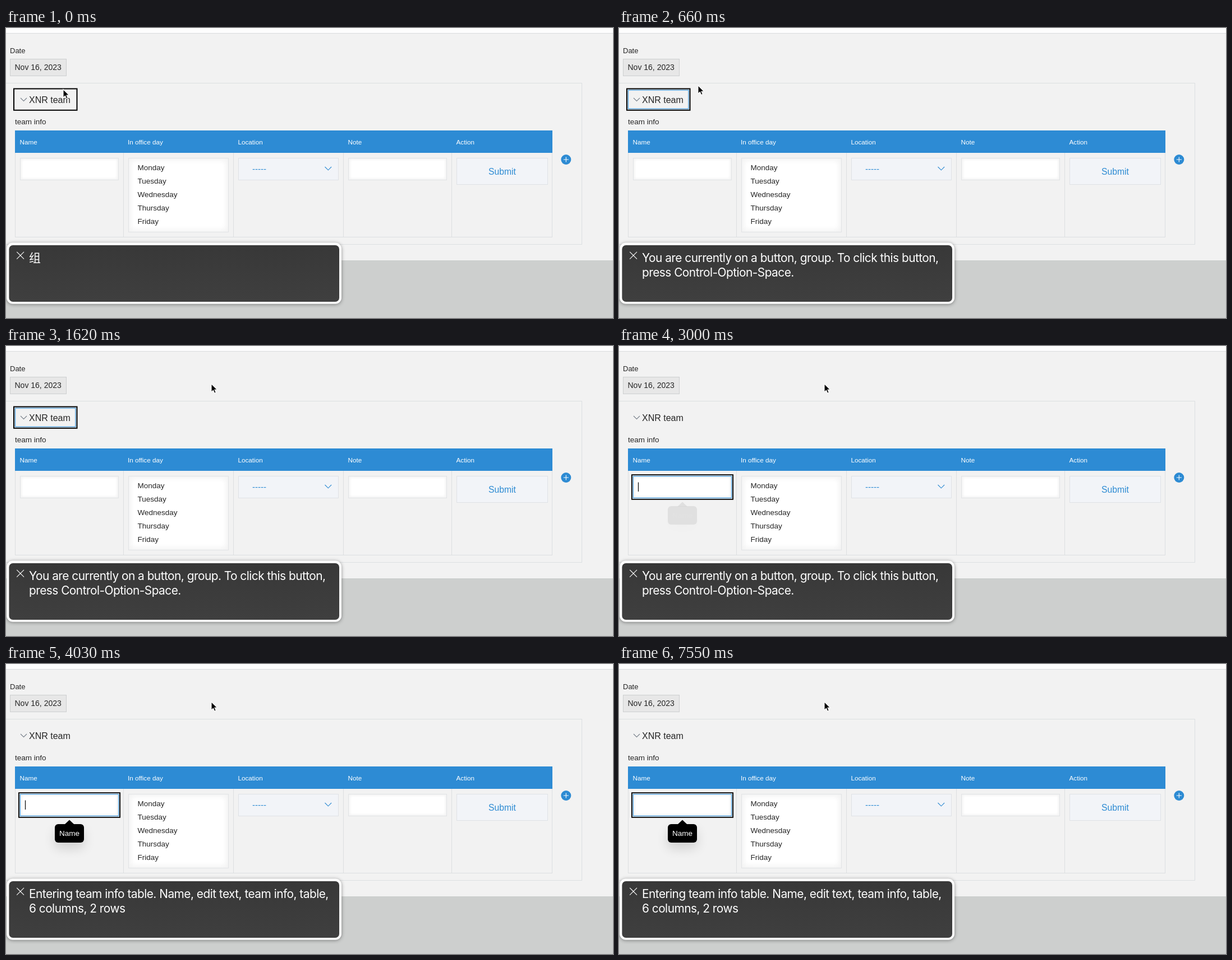
An HTML page for the animation above (8000 ms loop, 1082 by 518 pixels).

```html
<!DOCTYPE html>
<html lang="en">
<head>
<meta charset="utf-8">
<style>
  html, body { margin: 0; width: 100%; height: 100%; overflow: hidden; background: #f2f2f2; }
  #stage { position: relative; width: 1082px; height: 518px; overflow: hidden; }
  #stage div { position: absolute; box-sizing: border-box; }
  .line { border: 1px solid #dcdfe1; }
  .input { border: 1px solid #e1e3e5; background: #fff;
    box-shadow: inset 2px 2px 4px #f2f2f2, inset -2px -2px 4px #f2f2f2; }
  .list { box-shadow: inset 2px 2px 12px #f2f2f2, inset -2px -2px 12px #f2f2f2; }
  .button { border: 1px solid #dfe2e6; background: #f2f4f8; }
  .date { border: 1px solid #cdcfd0; background: #e7e7e7; }
  .tip { background: #000; border-radius: 6px; box-shadow: 0 10px 20px rgba(0, 0, 0, .14); }
  svg { position: absolute; left: 0; top: 0; font: 13.5px "Liberation Sans", sans-serif; }
  text { fill: #262626; white-space: pre; }
  .stroke { fill: none; stroke-width: 1.1; }
  .ring { fill: none; stroke: #000; stroke-width: 2; }
  .gap { fill: none; stroke: #fff; stroke-width: 1; }
  .glow { fill: none; stroke: #3b93d6; stroke-width: 1.2; }
  .frame { fill: #fff; filter: drop-shadow(0 1px 3px rgba(0, 0, 0, .4)); }
  .head text { fill: #fff; font-size: 11.7px; }
  .blue text { fill: #2d8bd3; }
  .caption text { fill: #fff; font: 20.85px Inter, "Noto Sans CJK SC", sans-serif;
    font-optical-sizing: none; letter-spacing: -.025em; }
</style>
</head>
<body>
<div id="stage">
  <svg id="art" width="1082" height="518">
    <defs>
      <linearGradient id="dark" x2="0" y2="1">
        <stop stop-color="#383838"/><stop offset="1" stop-color="#3f3f3f"/>
      </linearGradient>
    </defs>
    <text x="7" y="45" font-size="13">Date</text>
    <text x="15.5" y="75.2" font-size="14">Nov 16, 2023</text>
    <text x="41" y="133.5" font-size="16">XNR team</text>
    <text x="16" y="172">team info</text>
    <path class="stroke" stroke="#77808a" d="M26 125l5.5 5.5l5.5 -5.5"/>
    <g id="group">
      <rect class="ring" x="14" y="108.5" width="112.5" height="38.3"/>
      <rect id="groupGlow" class="glow" x="16.5" y="111" width="107.5" height="33.3"/>
    </g>
    <g class="head">
      <text x="24.5" y="207.5">Name</text>
      <text x="217" y="207.5">In office day</text>
      <text x="413.5" y="207.5">Location</text>
      <text x="609.5" y="207.5">Note</text>
      <text x="802.5" y="207.5">Action</text>
    </g>
    <g id="days"></g>
    <g class="blue">
      <text x="439" y="257" font-size="15">-----</text>
      <text x="884.5" y="261.5" font-size="15.7" text-anchor="middle">Submit</text>
      <path class="stroke" stroke="#2d8bd3" d="M568.5 248l5.8 5.8l5.8 -5.8"/>
      <circle cx="998.3" cy="235" r="9" fill="#2d8bd3"/>
      <path class="stroke" stroke="#fff" d="M993.8 235h9M998.3 230.5v9"/>
    </g>
    <g id="field">
      <rect class="ring" x="23" y="230.2" width="180" height="43.6"/>
      <rect class="gap" x="24.4" y="231.6" width="177.2" height="40.8"/>
      <rect class="glow" x="25.4" y="232.6" width="175.2" height="38.8"/>
    </g>
    <path id="caret" d="M34.5 243.5v16.5" stroke="#111" stroke-width="1.3"/>
    <g id="hint">
      <path d="M104.5 286.5l8.5 -8l8.5 8z"/>
      <text x="113" y="306.7" text-anchor="middle" style="fill:#fff">Name</text>
    </g>
    <rect class="frame" x="1.2" y="383.6" width="596.8" height="109.2" rx="11"/>
    <rect x="5.4" y="388" width="588.6" height="101" rx="7" fill="url(#dark)"/>
    <path class="stroke" stroke="#fff" stroke-width="1.4" d="M19.2 399.8l12.8 12.8M32 399.8l-12.8 12.8"/>
    <g class="caption">
      <text id="line1" x="41" y="418"></text>
      <text id="line2" x="41" y="444"></text>
    </g>
    <path id="cursor" d="M0 0V14.8L3.4 11.6L5.7 16.8L8.2 15.7L6 10.6H10.6Z"
      stroke="#fff" stroke-width="1.1"/>
  </svg>
</div>
<script>
  const $ = id => document.getElementById(id);

  function box(x, y, right, bottom, kind, fill) {
    const el = document.createElement('div');
    el.className = kind;
    Object.assign(el.style, { left: x + 'px', top: y + 'px',
      width: right - x + 'px', height: bottom - y + 'px' });
    if (fill) el.style.background = fill;
    $('stage').insertBefore(el, $('art'));
    return el;
  }

  box(0, 0, 1082, 9, '', '#fdfdfd');
  box(0, 9, 1082, 10, '', '#d9dcdd');
  box(0, 415, 1082, 518, '', '#cdcfce');
  box(7, 55, 108, 86, 'date');
  box(-2, 98, 1027, 387, 'line');
  box(16, 183, 974, 374, 'line');
  for (const x of [209, 405, 601, 794]) box(x, 223, x + 1, 374, '', '#dcdfe1');
  box(16, 183, 974, 223, '', '#2d8bd4');
  box(25, 232, 201, 272, 'input');
  box(218, 232, 397, 365, 'input list');
  box(414, 232, 593, 272, 'button');
  box(610, 232, 786, 272, 'input');
  box(803, 232, 966, 280, 'button');
  const tip = box(87, 286, 139, 318.5, 'tip');

  $('days').innerHTML = ['Monday', 'Tuesday', 'Wednesday', 'Thursday', 'Friday']
    .map((day, i) => `<text x="234.5" y="${254.3 + 24 * i}">${day}</text>`).join('');

  const captions = [
    [0, '组', ''],
    [140, 'You are currently on a button, group. To click this button,', 'press Control-Option-Space.'],
    [3210, 'Entering team info table. Name, edit text, team info, table,', '6 columns, 2 rows']
  ];

  const show = (el, on) => { el.style.display = on ? '' : 'none'; };
  const progress = (t, from, to) => Math.max(0, Math.min(1, (t - from) / (to - from)));
  const ease = p => p * p * (3 - 2 * p);

  function render(t) {
    const inField = t >= 3000;
    show($('group'), !inField);
    show($('groupGlow'), t >= 140);
    show($('field'), inField);
    show($('caret'), inField && t % 1000 < 550);
    tip.style.opacity = $('hint').style.opacity = progress(t, 2990, 3150);

    const [, first, second] = captions.filter(c => t >= c[0]).pop();
    $('line1').textContent = first;
    $('line2').textContent = second;

    const a = ease(progress(t, 390, 1000)), b = ease(progress(t, 1220, 1620));
    const x = 102 + 93.5 * a + 170.5 * b, y = 109.5 - 16.4 * a - 25.6 * b;
    $('cursor').setAttribute('transform', `translate(${x} ${y})`);
  }

  function tick() {
    render(performance.now() % 8000);
    requestAnimationFrame(tick);
  }
  tick();
</script>
</body>
</html>
```
